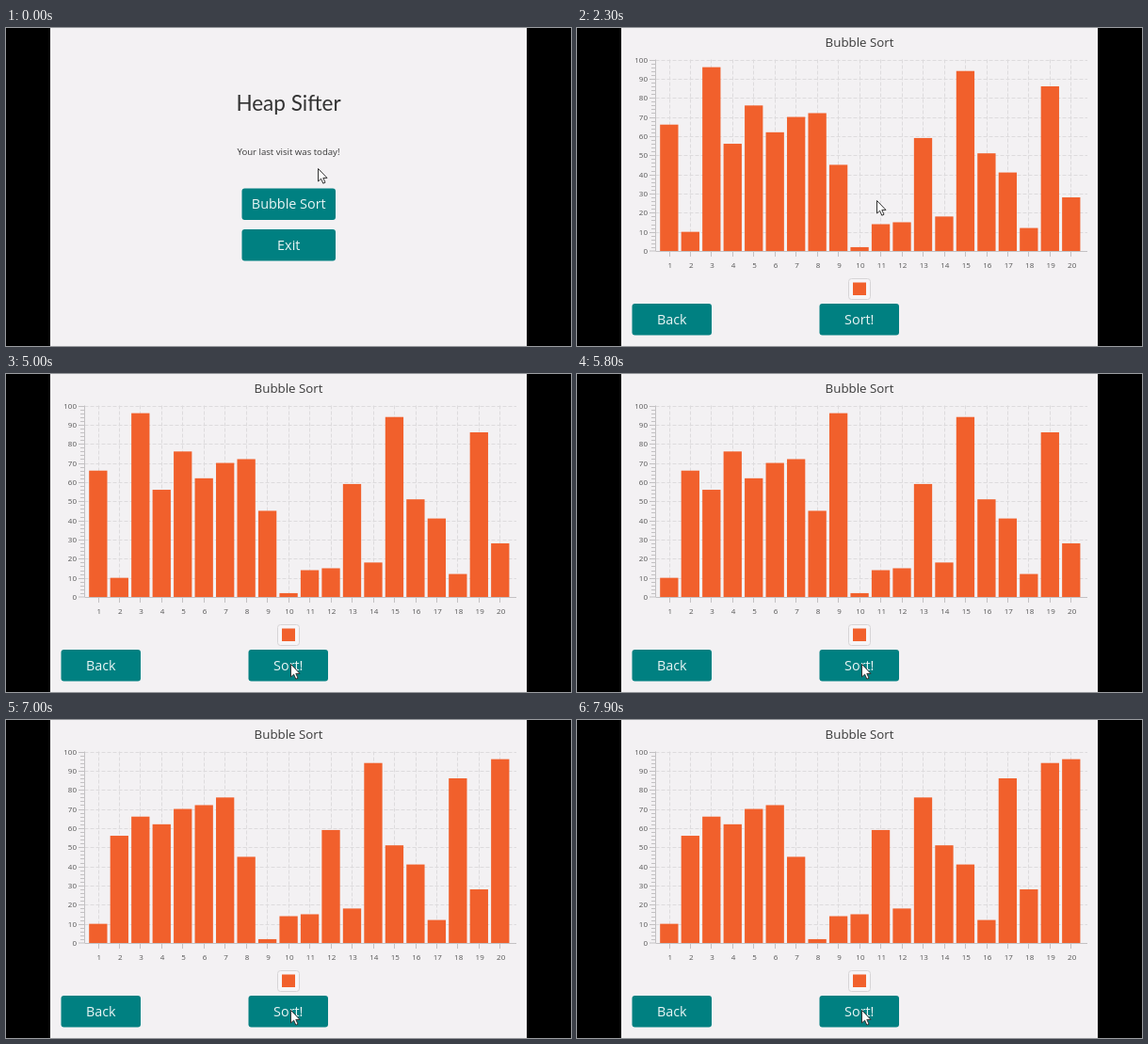
Animation of 600 by 338 pixels, one loop 8 s. Source, as an HTML page with a canvas:

```html
<!DOCTYPE html>
<html lang="en">
<head>
<meta charset="utf-8">
<title>Bubble sort demo</title>
<style>
  html, body { margin: 0; width: 100%; height: 100%; overflow: hidden; background: #000; }
  canvas { display: block; }
</style>
</head>
<body>
<canvas id="stage" width="600" height="338"></canvas>
<script>
const ctx = document.getElementById('stage').getContext('2d');
const LOOP = 8000, TICK = 100;
const CHART_AT = 2300, SORT_AT = 5230, SWAP_MS = 80;
const VALUES = [66, 10, 96, 56, 76, 62, 70, 72, 45, 2, 14, 15, 59, 18, 94, 51, 41, 12, 86, 28];
const TEAL = '#008081', ORANGE = '#f1602c', INK = '#3a3a3a';
const SANS = '"Open Sans", sans-serif';

// Chart geometry
const LEFT = 83.5, RIGHT = 542, BASE = 237, UNIT = 2.035, PITCH = 22.47;
const yOf = value => BASE - value * UNIT;
const xOf = index => 98 + index * PITCH;

function text(str, x, y, size, color = INK, align = 'center', font = SANS) {
  ctx.font = `${size}px ${font}`;
  ctx.fillStyle = color;
  ctx.textAlign = align;
  ctx.fillText(str, x, y);
}

function line(x1, y1, x2, y2, color, dash = []) {
  ctx.strokeStyle = color;
  ctx.lineWidth = 1;
  ctx.setLineDash(dash);
  ctx.beginPath();
  ctx.moveTo(x1, y1);
  ctx.lineTo(x2, y2);
  ctx.stroke();
  ctx.setLineDash([]);
}

function roundBox(x, y, w, h, r) {
  ctx.beginPath();
  ctx.roundRect(x, y, w, h, r);
}

function button(label, x, y, w, h) {
  ctx.fillStyle = TEAL;
  roundBox(x, y, w, h, 3);
  ctx.fill();
  text(label, x + w / 2, y + h / 2 + 5.2, 14.4, '#eaf5f5');
}

function drawMenu() {
  text('Heap Sifter', 300, 88, 22.5, '#333', 'center', 'bold 22.5px Lato, sans-serif'.slice(12));
  text('Your last visit was today!', 300, 134.5, 9.6);
  button('Bubble Sort', 250.5, 170.5, 99.5, 33.5);
  button('Exit', 250.5, 214, 99.5, 33.5);
}

// State of the bars after a given number of swaps
function bubble(swaps) {
  const a = [...VALUES];
  for (let end = a.length - 1; end > 0; end--) {
    for (let i = 0; i < end; i++) {
      if (a[i] <= a[i + 1]) continue;
      if (swaps-- <= 0) return a;
      [a[i], a[i + 1]] = [a[i + 1], a[i]];
    }
  }
  return a;
}

function drawChart(bars) {
  const grid = '#dddbdd', axis = '#c3c1c3';
  text('Bubble Sort', 300, 19.5, 13.3);

  for (let v = 0; v <= 100; v += 2) {
    const y = Math.round(yOf(v)) + (v ? 0.5 : 0);
    const major = v % 10 === 0;
    if (major) {
      if (v) line(LEFT, y, RIGHT, y, grid, [4, 2]);
      text(v, 75, yOf(v) + 3, 8, '#555', 'right');
    }
    line(major ? 77 : 79, y, LEFT, y, axis);
  }
  bars.forEach((value, i) => {
    const x = Math.floor(xOf(i)) + 0.5;
    line(x, yOf(100), x, BASE, grid, [4, 2]);
    line(x, BASE, x, BASE + 6, axis);
    text(i + 1, xOf(i) + 0.7, 255, 8, '#555');
  });
  line(LEFT, yOf(100), LEFT, BASE, axis);

  ctx.fillStyle = ORANGE;
  bars.forEach((value, i) => ctx.fillRect(xOf(i) - 9.8, yOf(value), 19.3, value * UNIT));
  line(LEFT, BASE + 0.5, RIGHT, BASE + 0.5, axis);

  ctx.fillStyle = '#f7f5f7';
  ctx.strokeStyle = '#d6d4d6';
  roundBox(288.5, 266.5, 23, 22, 3);
  ctx.fill();
  ctx.stroke();
  ctx.fillStyle = ORANGE;
  ctx.fillRect(293, 270.5, 14, 13.5);

  button('Back', 58.5, 293, 84.5, 33.5);
  button('Sort!', 257.5, 293, 84.5, 33.5);
}

// Straight pointer moves: [start, end, x, y]
const MOVES = [[700, 1200, 318, 183], [3400, 3700, 302, 308]];

function pointerAt(t) {
  let x = 331, y = 149;
  for (const [start, end, toX, toY] of MOVES) {
    const p = Math.min(1, Math.max(0, (t - start) / (end - start)));
    x += (toX - x) * p;
    y += (toY - y) * p;
  }
  return [x, y];
}

function drawPointer([x, y]) {
  const shape = new Path2D('M.5.5V14L3.6 11.2 5.8 16.2 8 15.2 5.8 10.4H10Z');
  ctx.save();
  ctx.translate(x, y);
  ctx.fillStyle = '#fff';
  ctx.strokeStyle = '#333';
  ctx.fill(shape);
  ctx.stroke(shape);
  ctx.restore();
}

function draw(t) {
  ctx.fillStyle = '#000';
  ctx.fillRect(0, 0, 600, 338);
  ctx.fillStyle = '#f3f1f3';
  ctx.fillRect(47, 0, 506, 338);
  if (t < CHART_AT) drawMenu();
  else drawChart(bubble(Math.max(0, Math.floor((t - SORT_AT) / SWAP_MS))));
  drawPointer(pointerAt(t));
}

const origin = performance.now();
function frame() {
  const t = (performance.now() - origin) % LOOP;
  draw(Math.floor(t / TICK) * TICK);
  requestAnimationFrame(frame);
}
frame();
</script>
</body>
</html>
```
